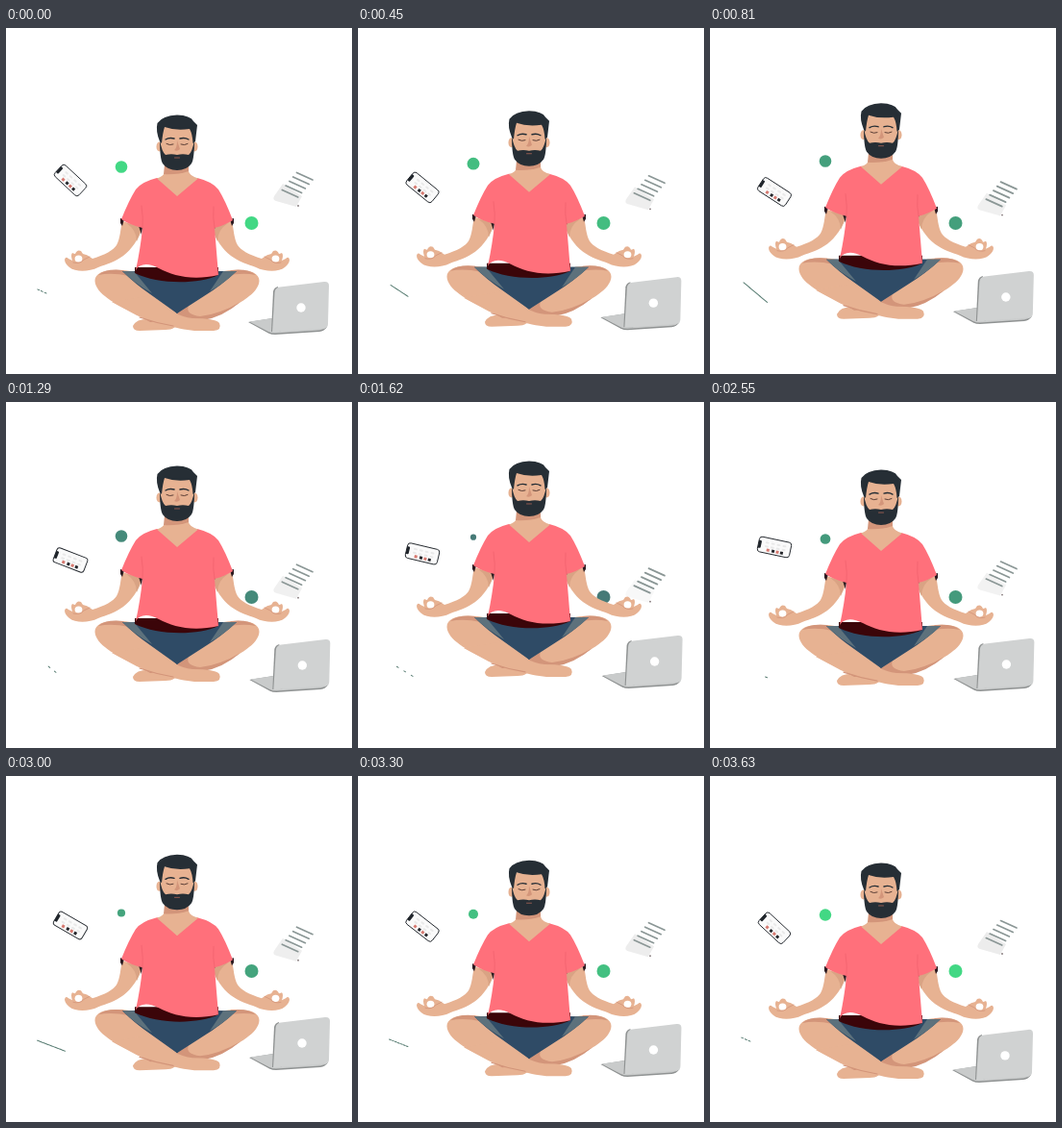
An HTML page that plays this animation: 360x360 px, repeating every 3.66 s.

```html
<!DOCTYPE html>
<html lang="en">
<head>
<meta charset="utf-8">
<title>Calm developer</title>
<style>
  html, body { margin: 0; width: 100%; height: 100%; overflow: hidden; background: #fff }
  svg { display: block; width: 100vw; height: 100vh }
  .skin { fill: #e7b292 }
  .shade { fill: #d3957a }
  .hair { fill: #262e35 }
  .line { fill: none; stroke-linecap: round }
</style>
</head>
<body>
<svg viewBox="0 0 360 360">
  <defs>
    <g id="arm">
      <path class="skin" d="M121 201 L142 207 C138 220 131 230 122 237 C114 243 104 246 96 249 C86 254 72 254 66 249 Q61 245 61 241 Q62 237 65 240 L69 242 Q67 236 69 234 Q71 235 72 235 Q74 230 78 232 L80 235 Q85 236 87 238 L90 240 C103 236 112 231 115 226 C119 219 119 209 121 201Z"/>
      <path fill="#d9a384" d="M125 203 L142 207 L136 222 Q136 210 125 203Z"/>
      <ellipse cx="75.500" cy="240" rx="3.900" ry="3.600" fill="#fff"/>
      <path class="line" stroke="#d3957a" stroke-width=".8" d="M70 244 Q77 246 81 241 L87 238"/>
      <path fill="#2b1a20" d="M119 198 L123 199 L121 206 L119 203Z M138 206 L142 207 L141 215Z"/>
    </g>
    <g id="knee">
      <path class="skin" d="M178 297 L135 254 C112 249 92 252 92.500 263 C93 276 113 287 136 298 L178 306Z"/>
      <path class="shade" d="M96 257 Q104 250 122 252 L128 258 Q110 254 96 257Z"/>
    </g>
    <g id="face-side">
      <ellipse class="skin" cx="159.500" cy="123.500" rx="3" ry="5"/>
      <path class="line" stroke="#232c34" stroke-width="1.400" d="M166 116 Q170 113.500 175 115"/>
      <path class="line" stroke="#4a302b" stroke-width=".9" d="M167 120.500 Q170.500 122.500 174 121"/>
    </g>
  </defs>

  <circle id="badge" r="6.300"/>
  <circle id="dot" cx="255.500" cy="203" r="7"/>

  <g id="paper">
    <path id="sheet" fill="#ececec" d="M288 162 L279 175 Q277 179 281 180 L302 186 L308 175Z"/>
    <path id="rows" class="line" stroke="#8b9796" stroke-width="1.700"/>
    <circle cx="304" cy="185" r=".9" fill="#817577"/>
  </g>

  <g id="phone">
    <rect x="-17" y="-8" width="34" height="16" rx="3" fill="#fafafa" stroke="#20252b" stroke-width=".9"/>
    <path fill="#20252b" d="M-17 -4 h2 q1 0 1 1 v6 q0 1 -1 1 h-2Z"/>
    <path class="line" stroke="#e9e9e9" stroke-width="2" stroke-dasharray="2 4" d="M-9 -3 H12 M-9 1 H12"/>
    <path stroke="#d67970" stroke-width="3" d="M-7.500 4.500 h3 M2.500 4.500 h3"/>
    <path stroke="#25262b" stroke-width="3" d="M-2 4.500 h3 M7 4.500 h3"/>
  </g>

  <path id="pencil" class="line" stroke="#557a70"/>

  <g id="laptop">
    <path fill="#8f9292" d="M252 306 L277 302 L334 311 Q331 315.500 326 316 L280 319 Q276 319 273 317.500Z"/>
    <path fill="#c9cbcb" d="M253 305.500 L277 302 L334 311 Q331 314 326 314.500 L280 317.500 Q276 317.500 273 316Z"/>
    <path fill="#8f9292" d="M276 316 L278 274 Q279 270 283 269 L286 316Z"/>
    <path fill="#d0d2d2" d="M277 316.500 L279.500 275 Q280 270 285 269.500 L331 264 Q336 263.500 336 268 L335 308 Q335 312 331 312.500Z"/>
    <circle cx="307" cy="291" r="4.700" fill="#fff"/>
  </g>

  <g id="man">
    <path class="skin" d="M132 310 Q136 301 154 303 L178 305 Q178 314 166 314 L139 315 Q132 315 132 310Z"/>
    <path fill="#2f4b66" d="M121 253 L240 253 Q224 268 206 279 L178 299 L150 278Z"/>
    <use href="#knee"/>
    <use href="#knee" transform="matrix(-1 0 0 1 356 0)"/>
    <path class="shade" d="M178 297 L190 289 Q186 298 202 300 Q222 298 244 285 Q225 301 205 304 L150 306 L136 298Z"/>
    <path class="skin" d="M110 285 L150 278 Q174 300 194 302 Q218 302 222 307 Q225 314 216 315 L196 315 C178 313 151 306 136 299Z"/>
    <path class="line" stroke="#d3957a" stroke-width="1.200" d="M139 301 Q156 307 174 310"/>
    <path fill="#2f4b66" d="M121 253 L240 253 Q224 268 206 279 L178 297 L150 277 Q134 266 121 253Z"/>
    <path fill="#5d717c" d="M121 253 H133 L152 276 Q134 266 121 253Z M240 253 H226 L212 274 Q228 265 240 253Z"/>

    <use href="#arm"/>
    <use href="#arm" transform="matrix(-1 0 0 1 356 0)"/>
    <path fill="#3b0509" d="M134 249 H221 V257 C200 267 158 267 134 255Z"/>
    <path fill="#ff707b" d="M157 156 Q141 160 135 168 Q128 179 120 199 Q129 205 142 208 Q140 229 135 252 C139 245 148 244 159 250 C174 258 194 263 221 257 L217 208 Q228 205 236 200 Q228 179 221 168 Q215 160 199 156Z"/>
    <path class="line" stroke="#f2626f" stroke-width=".8" d="M142 208 Q143 198 141 185 M217 208 Q215 198 216 186"/>

    <path class="skin" d="M165 140 L165 150 Q164 154 157 156.500 L178 175 L200 156.500 Q191 154 190 149 L190 140Z"/>
    <path class="shade" d="M165 142 H190 V149 Q178 153 164 152Z"/>
    <path class="skin" d="M161 103 H195 V132 Q178 147 161 132Z"/>
    <use href="#face-side"/>
    <use href="#face-side" transform="matrix(-1 0 0 1 356 0)"/>
    <path class="shade" d="M178 117 L181 126 Q178 129 175 127 Q178 125 178 117Z"/>
    <path class="hair" d="M160 118 Q155.500 107 157.500 99 Q163 91 178 90.500 Q192 91 195 97 L199 101 L197 118 L194.500 120 Q194 110 191 105 Q176 107 165 103 Q163 109 162 120Z"/>
    <path class="hair" d="M160 116 Q162 129 166 132 Q172 130.500 178 132 Q184 130.500 190 132 Q194 129 196 116 Q196 136 193 141 Q188 148 178 148 Q168 148 163 141 Q160 136 160 116Z"/>
    <path class="line" stroke="#91594f" d="M175.500 135 H180.500"/>
  </g>
</svg>
<script>
const LOOP = 3660, STEP = 30;
const times = [0, 810, 1290, 2010, 2550, 3000];
const el = id => document.getElementById(id);
const set = (id, name, value) => el(id).setAttribute(name, value);

// Smooth cyclic curve through one value per entry in times.
function curve(values) {
  const n = times.length;
  const at = i => times[(i + n) % n] + LOOP * Math.floor(i / n);
  const val = i => values[(i + n) % n];
  const slope = i => (val(i + 1) - val(i - 1)) / (at(i + 1) - at(i - 1));
  return t => {
    let i = n - 1;
    while (times[i] > t) i--;
    const h = at(i + 1) - at(i), u = (t - at(i)) / h, v = 1 - u;
    return v * v * ((1 + 2 * u) * val(i) + u * h * slope(i)) +
           u * u * ((1 + 2 * v) * val(i + 1) - v * h * slope(i + 1));
  };
}

const phoneY = curve([158.5, 170.5, 164.5, 151, 151, 155.5]);
const phoneAngle = curve([43, 33, 21, 7, 12, 30]);
const laptopY = curve([0, -11, -17, -24, -18, -13]);
const badgeY = curve([144.5, 138.5, 139.5, 142, 142.5, 142.5]);
const badgeSize = curve([1, 1, 1, 0, 0.85, 0.65]);
const tint = curve([0, 0.55, 0.75, 1, 0.6, 0.5]);
const sheetAlpha = curve([1, 0.8, 0.8, 0, 0.7, 0.9]);
const pencilY = curve([278, 274.5, 277, 281, 281.5, 280.5]);
const pencilAngle = curve([24, 40, 38, 23, 22, 21]);
const pencilFrom = curve([0, 0, 12, 4, 27, 0]);
const pencilTo = curve([11, 32, 27, 29, 30, 31]);
const pencilGap = curve([2, 0, 6, 6, 2, 0.5]);

const mix = (a, b, k) => a.map((c, i) => Math.round(c + (b[i] - c) * k));

set('rows', 'd', [0, 1, 2, 3, 4].map(i => `M${302.5 - i * 3.8} ${150.5 + i * 4.5} l16.5 7.5`).join(''));

function draw(now) {
  const t = Math.floor(now % LOOP / STEP) * STEP;
  const lift = 1 - Math.cos(2 * Math.PI * t / LOOP);
  const ly = laptopY(t);
  const green = `rgb(${mix([66, 216, 132], [70, 112, 118], tint(t))})`;

  set('man', 'transform', `translate(0 ${-15 * lift})`);
  set('paper', 'transform', `translate(0 ${11.7 * lift})`);
  set('sheet', 'opacity', Math.max(0, Math.min(1, sheetAlpha(t))));
  set('laptop', 'transform', `translate(${-ly / 13} ${ly})`);
  set('phone', 'transform', `translate(67 ${phoneY(t)}) rotate(${phoneAngle(t)})`);
  set('badge', 'transform', `translate(120 ${badgeY(t)}) scale(${Math.max(0, badgeSize(t))})`);
  set('badge', 'fill', green);
  set('dot', 'fill', green);

  const from = Math.max(0, pencilFrom(t)), to = Math.min(32, pencilTo(t));
  set('pencil', 'd', `M${from - 15} 0 H${to - 15}`);
  set('pencil', 'stroke-dasharray', `2 ${Math.max(0, pencilGap(t))}`);
  set('pencil', 'transform', `translate(46.5 ${pencilY(t)}) rotate(${pencilAngle(t)})`);
  requestAnimationFrame(() => draw(performance.now() - start));
}

const start = performance.now();
draw(0);
</script>
</body>
</html>
```
